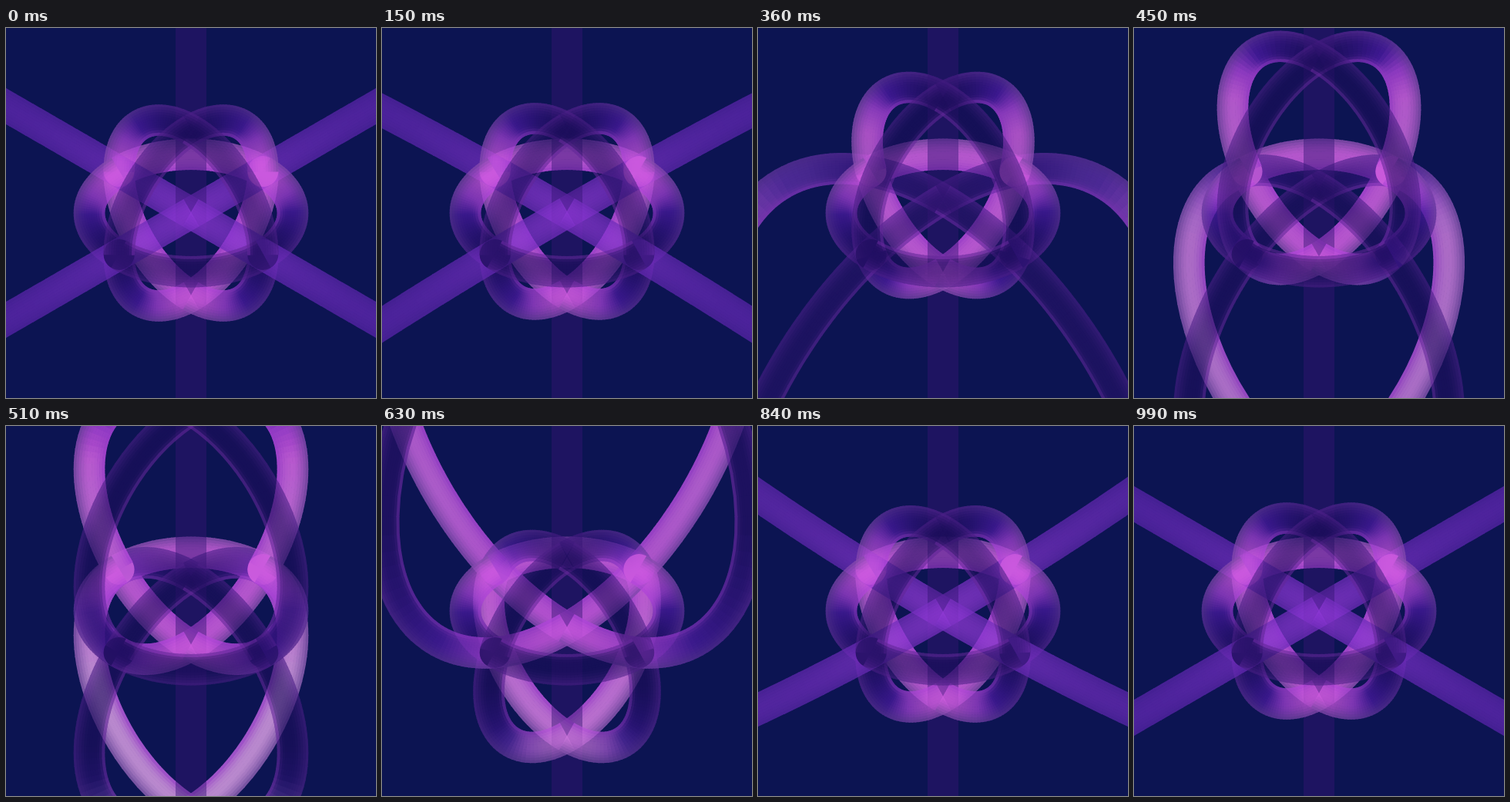
Recreate the animation shown at these times as an HTML page with a canvas. Size 480 by 480 pixels, loop 1020 ms.

```html
<!DOCTYPE html>
<html lang="en">
<head>
<meta charset="utf-8">
<title>Turning rings</title>
<style>
  html, body { margin: 0; width: 100%; height: 100%; overflow: hidden; background: #0c1452; }
  canvas { display: block; width: 480px; height: 480px; }
</style>
</head>
<body>
<canvas id="stage" width="480" height="480"></canvas>
<script>
const SIZE = 480, MID = 240, R = 132, TUBE = 40;
const STEPS = 34, STEP_MS = 30;
const SAMPLES = 44, LANES = 12;

const ctx = document.getElementById('stage').getContext('2d');
const layer = document.createElement('canvas');
layer.width = layer.height = SIZE;
const pen = layer.getContext('2d');

const clamp = (x, lo = 0, hi = 1) => Math.min(hi, Math.max(lo, x));
const smooth = u => u * u * (3 - 2 * u);
const cycloid = u => u - Math.sin(2 * Math.PI * u) / (2 * Math.PI);
const ease = u => 0.75 * smooth(smooth(u)) + 0.25 * cycloid(u);
const mix = (a, b, k) => a.map((x, i) => x + (b[i] - x) * k);
const css = c => `rgb(${c.map(Math.round).join()})`;

// Colour by how far the ring's outward direction turns away (-) or to the viewer (+)
const RAMP = [
  [-0.8, [206, 98, 222]],
  [-0.5, [212, 92, 226]],
  [-0.25, [165, 66, 212]],
  [0, [72, 26, 158]],
  [0.3, [46, 18, 120]],
  [0.6, [26, 13, 88]]
];
const INNER = [172, 66, 216], OUTER = [92, 38, 150], HAZE = [104, 68, 152], LILAC = [216, 166, 226];
const FAR = [92, 38, 176], HUB = [142, 56, 214];

function ramp(v) {
  if (v <= RAMP[0][0]) return RAMP[0][1];
  for (let i = 1; i < RAMP.length; i++) {
    const [a, ca] = RAMP[i - 1], [b, cb] = RAMP[i];
    if (v <= b) return mix(ca, cb, (v - a) / (b - a));
  }
  return RAMP[RAMP.length - 1][1];
}

// o runs across the tube: -1 outer edge, 1 inner edge
function shade(p, o, arc) {
  let c = ramp(p.face);
  c = mix(c, LILAC, clamp((p.r2 - 1) / 3) * clamp(-2.4 * p.depth) * clamp(1.8 * arc.bend));
  const front = clamp(0.35 + 1.2 * p.face);
  if (o > 0) {
    c = mix(c, INNER, 0.85 * Math.pow(o, 2.2 + 4 * front));
  } else {
    c = mix(c, mix(HAZE, OUTER, front), 0.8 * Math.pow(-o, 1.6));
  }
  const line = mix(mix(FAR, HUB, 1 / (1 + 0.8 * p.r2)), [66, 28, 145], o * o * 0.35);
  return mix(c, line, arc.flat);
}

// Stereographic image of a point on the 3-sphere, seen along the diagonal
function project([a, b, c, w]) {
  const k = 1 / Math.max(1 - w, 1e-4);
  return {
    x: MID + R * k * (b - a) * Math.SQRT1_2,
    y: MID + R * k * (a + b - 2 * c) / Math.sqrt(6),
    r2: (1 + w) * k,
    depth: (a + b + c) / Math.sqrt(3),
    pos: [a * k, b * k, c * k],
    w
  };
}

function vertex(axis, sign, turn) {
  const p = [0, 0, 0, 0];
  p[axis] = sign;
  const s = Math.sin(turn), co = Math.cos(turn);
  return [p[0], p[1], co * p[2] - s * p[3], s * p[2] + co * p[3]];
}

function makeArc(A, B) {
  const bend = 1 - A[3] * A[3] - B[3] * B[3]; // 1 / radius squared
  const flat = 1 / (1 + 40 * Math.max(0, bend));
  const hub = A.map((x, i) => (x * A[3] + B[i] * B[3]) / (bend + 1e-6));
  hub[3] = 0;
  const pts = [];
  for (let i = 0; i <= SAMPLES; i++) {
    const t = i / SAMPLES * Math.PI / 2;
    const p = project(A.map((x, j) => x * Math.cos(t) + B[j] * Math.sin(t)));
    if (p.w < 0.995) pts.push(p);
  }
  const n = pts.length - 1;
  pts.forEach((p, i) => {
    const a = pts[Math.max(0, i - 1)], b = pts[Math.min(n, i + 1)];
    const dx = b.x - a.x, dy = b.y - a.y, d = Math.hypot(dx, dy) || 1;
    p.nx = -dy / d;
    p.ny = dx / d;
    const out = p.pos.map((x, j) => x - hub[j]);
    p.face = (out[0] + out[1] + out[2]) / (Math.hypot(...out) || 1) / Math.sqrt(3);
  });
  const mid = pts[n >> 1], center = project(hub);
  const toward = mid.nx * (center.x - mid.x) + mid.ny * (center.y - mid.y);
  const side = flat < 0.999 && toward < 0 ? -1 : 1;
  return { pts, flat, bend, side, depth: mid.depth, face: mid.face * (1 - flat) };
}

function drawArc(arc) {
  const { pts, side, face } = arc;
  pen.clearRect(0, 0, SIZE, SIZE);
  pen.fillStyle = css(shade(pts[0], 0, arc));
  pen.beginPath();
  pen.arc(pts[0].x, pts[0].y, TUBE / 2, 0, Math.PI * 2);
  pen.fill();
  pen.lineWidth = TUBE / LANES + 0.6;
  for (let k = 0; k < LANES; k++) {
    const o = (k + 0.5) / LANES * 2 - 1, off = o * side * TUBE / 2;
    for (let i = 1; i < pts.length; i++) {
      const a = pts[i - 1], b = pts[i];
      const ax = a.x + a.nx * off, ay = a.y + a.ny * off;
      const bx = b.x + b.nx * off, by = b.y + b.ny * off;
      const d = Math.hypot(bx - ax, by - ay) || 1;
      const ex = (bx - ax) / d * 0.6, ey = (by - ay) / d * 0.6;
      pen.strokeStyle = css(shade(b, o, arc));
      pen.beginPath();
      pen.moveTo(ax - ex, ay - ey);
      pen.lineTo(bx + ex, by + ey);
      pen.stroke();
    }
  }
  ctx.globalAlpha = clamp(0.74 - 0.25 * face, 0.58, 0.88);
  ctx.drawImage(layer, 0, 0);
  ctx.globalAlpha = 1;
}

function drawColumn() {
  ctx.fillStyle = 'rgba(52, 20, 115, 0.45)';
  ctx.fillRect(MID - TUBE / 2, 0, TUBE, SIZE);
}

function draw(step) {
  const turn = ease(step / STEPS) * Math.PI / 2;
  const arcs = [];
  for (let i = 0; i < 2; i++) { // the ring of axes 2 and 3 is the upright column
    for (let j = i + 1; j < 4; j++) {
      for (const s of [1, -1]) {
        for (const q of [1, -1]) arcs.push(makeArc(vertex(i, s, turn), vertex(j, q, turn)));
      }
    }
  }
  arcs.sort((a, b) => a.depth - b.depth);
  ctx.fillStyle = '#0c1452';
  ctx.fillRect(0, 0, SIZE, SIZE);
  arcs.filter(a => a.depth < -0.01).forEach(drawArc);
  drawColumn();
  arcs.filter(a => a.depth >= -0.01).forEach(drawArc);
}

const start = performance.now();
let shown = -1;
function tick() {
  const step = Math.floor((performance.now() - start) / STEP_MS) % STEPS;
  if (step !== shown) draw(shown = step);
  requestAnimationFrame(tick);
}
tick();
</script>
</body>
</html>
```
